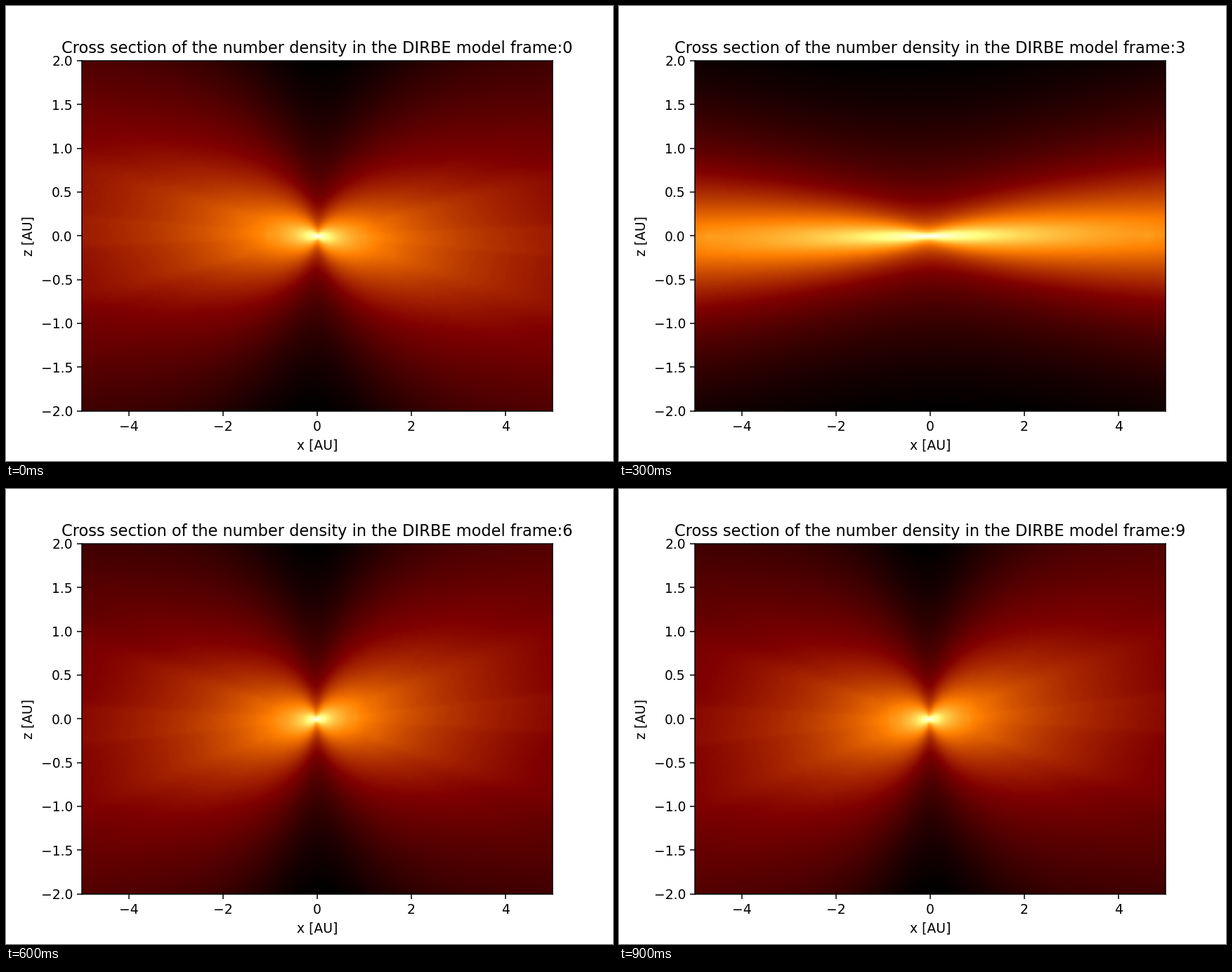
A matplotlib script for the animation above (1 s loop, 864x648 px).

```python
import matplotlib.pyplot as plt
import numpy as np
from matplotlib.animation import FuncAnimation
from matplotlib.colors import LogNorm

N = 200
FRAMES = 10
x = np.linspace(-5, 5, N)
z = np.linspace(-2, 2, N)


def height(px, py, pz, incl, node):
    """Distance above a plane with the given inclination and node (degrees)."""
    i, node = np.radians([incl, node])
    return (px * np.sin(node) - py * np.cos(node)) * np.sin(i) + pz * np.cos(i)


def cloud(px, py, pz):
    px, py, pz = px - 0.0119, py - 0.0055, pz + 0.0022
    r = np.sqrt(px**2 + py**2 + pz**2)
    zeta = np.abs(height(px, py, pz, 2.03, 77.7)) / r
    mu = 0.189
    g = np.where(zeta < mu, zeta**2 / (2 * mu), zeta - mu / 2)
    return 1.13e-7 * r**-1.34 * np.exp(-4.14 * g**0.942)


def band(px, py, pz, n0, incl, node, delta, v, r_in):
    r = np.sqrt(px**2 + py**2 + pz**2)
    q = np.abs(height(px, py, pz, incl, node)) / r / np.radians(delta)
    inner = 1 - np.exp(-((r / r_in) ** 20))
    return 3 * n0 / r * np.exp(-(q**6)) * (1 + q**4 / v) * inner


def ring(px, py, pz):
    r = np.sqrt(px**2 + py**2 + pz**2)
    h = np.abs(height(px, py, pz, 0.49, 22.3))
    return 1.83e-8 * np.exp(-((r - 1.03) ** 2) / (2 * 0.025**2) - h / 0.054)


def density(px, py, pz):
    p = px, py, pz
    return (cloud(*p) + ring(*p)
            + band(*p, 5.59e-10, 0.56, 80.0, 8.78, 0.1, 1.5)
            + band(*p, 1.99e-9, 1.2, 30.3, 1.99, 0.9, 0.94)
            + band(*p, 1.44e-10, 0.8, 80.0, 15.0, 0.1, 1.5))


def section(frame):
    """Cross section next to y = 0, with the value range around the centre."""
    angle = np.pi * frame / FRAMES
    xs = x * (np.cos(angle) - np.sin(angle))
    ys = x * (np.cos(angle) + np.sin(angle))
    gx, gz = np.meshgrid(xs, z)
    below, above = (density(gx, ys[k], gz) for k in (N // 2 - 1, N // 2))
    return above, min(below.min(), above.min()), max(below.max(), above.max())


fig, ax = plt.subplots(figsize=(6.4, 4.8), dpi=135)
values, low, high = section(0)
mesh = ax.pcolormesh(x, z, values, cmap="afmhot", norm=LogNorm(low, high),
                     shading="gouraud", rasterized=True)
ax.set(xlim=(-5, 5), ylim=(-2, 2), xlabel="x [AU]", ylabel="z [AU]")
title = ax.set_title("")


def update(frame):
    values, low, high = section(frame)
    mesh.set_array(values)
    mesh.set_clim(low, high)
    title.set_text("Cross section of the number density in the DIRBE model "
                   f"frame:{frame}")
    return mesh, title


anim = FuncAnimation(fig, update, frames=FRAMES, interval=100,
                     repeat=True, repeat_delay=0)
plt.show()
```
